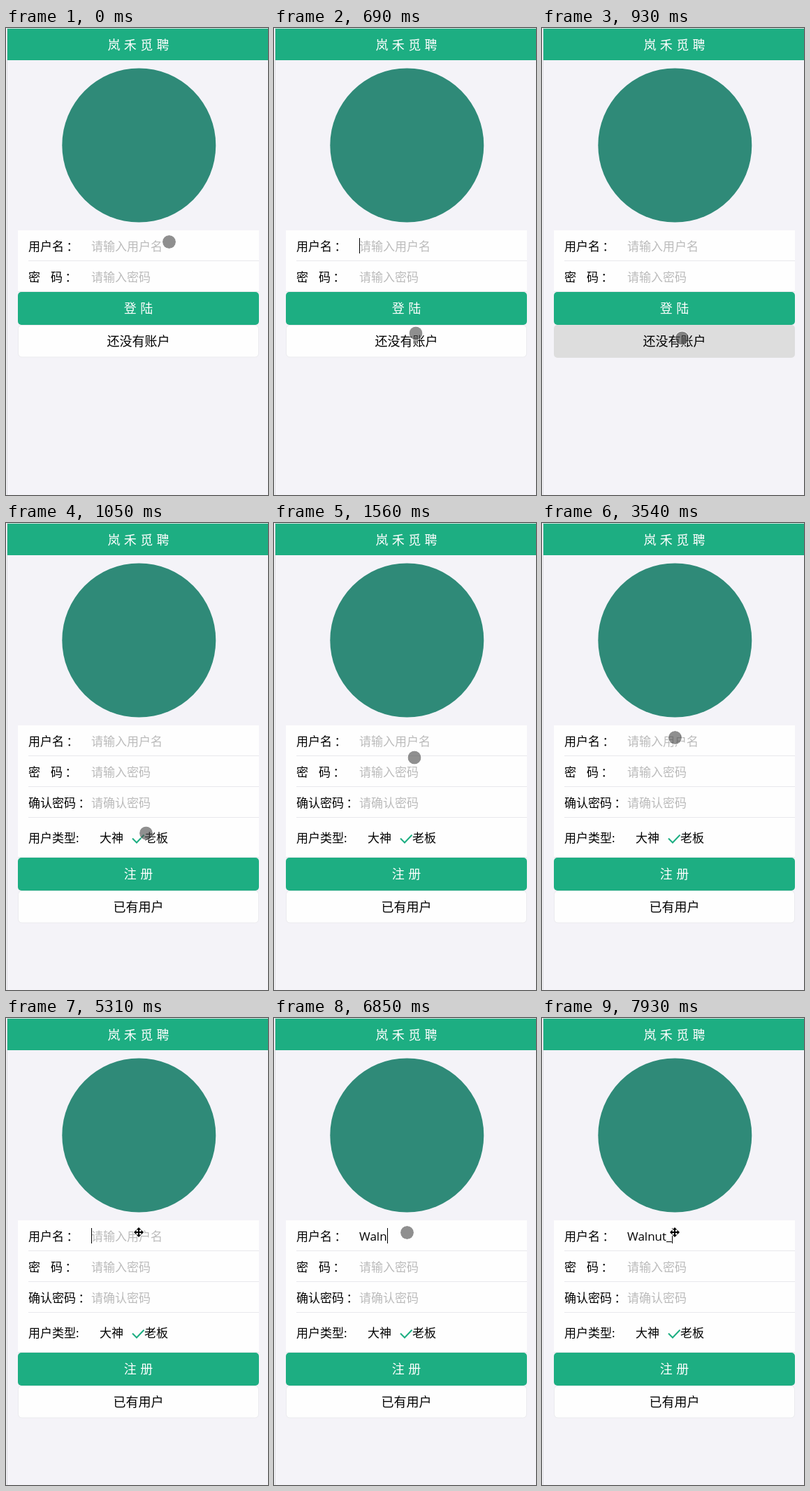
These frames come from a looping animation (375 px wide and 667 px high, 8000 ms). An HTML page with a canvas:

```html
<!DOCTYPE html>
<html lang="zh-CN">
<head>
<meta charset="utf-8">
<title>岚禾觅聘</title>
<style>
  html, body { margin: 0; width: 100%; height: 100%; overflow: hidden; background: #f4f3f8; }
  canvas { display: block; width: 375px; height: 667px; }
</style>
</head>
<body>
<canvas id="stage"></canvas>
<script>
const W = 375, H = 667, LOOP = 8000;
const GREEN = '#1dae82', BG = '#f4f3f8', LINE = '#e8e8ec', HINT = '#bbb';
const FONT = '"Open Sans", "Noto Sans CJK SC", "Noto Sans CJK", sans-serif';
const PRESS = 930, SWITCH = 1050, USER = 'Walnut_';

// [time, x, y] of the touch point, held until the next entry
const PATH = [
  [0, 233.5, 305.5], [300, 238, 318], [420, 228, 368], [540, 212, 418],
  [690, 203, 436], [810, 200.5, 443], [1170, 203, 447], [1320, 210, 416],
  [1440, 208, 374], [1560, 201, 335], [1710, 202, 314], [2150, 192.5, 307],
  [2270, 190.5, 306.5]
];
const KEYS = [5740, 6020, 6420, 6850, 7010, 7160, 7930];
const CARET = [[420, 810], [2150, 2550], [3100, 3540], [4010, 4600],
  [5060, 5620], [5740, 7680], [7930, LOOP]];
const MOVE = [[5310, 5620], [7680, LOOP]];

const canvas = document.getElementById('stage');
const ctx = canvas.getContext('2d');
const dpr = window.devicePixelRatio || 1;
canvas.width = W * dpr;
canvas.height = H * dpr;
ctx.scale(dpr, dpr);

const within = (t, spans) => spans.some(([a, b]) => t >= a && t < b);

function rect(x, y, w, h, color) {
  ctx.fillStyle = color;
  ctx.fillRect(x, y, w, h);
}

function disc(x, y, r, color) {
  ctx.fillStyle = color;
  ctx.beginPath();
  ctx.arc(x, y, r, 0, Math.PI * 2);
  ctx.fill();
}

function text(str, x, midY, color = '#000', size = 17) {
  ctx.font = `${size}px ${FONT}`;
  ctx.fillStyle = color;
  ctx.fillText(str, x, midY + 6);
}

function centered(str, midY, color, gap = 0) {
  const pitch = 18 + gap;
  const left = 189.5 - (pitch * str.length - gap) / 2;
  [...str].forEach((ch, i) => text(ch, left + i * pitch, midY, color, 18));
}

function box(x, y, w, h, fill, stroke) {
  ctx.beginPath();
  ctx.roundRect(x, y, w, h, 5);
  ctx.fillStyle = fill;
  ctx.fill();
  if (stroke) {
    ctx.strokeStyle = stroke;
    ctx.lineWidth = 1;
    ctx.stroke();
  }
}

// the full-width colon sits a little right of the label
function colon(x, midY) {
  text('：', x + 3.5, midY);
}

function buttons(y, main, other, pressed) {
  box(17, y, 345, 47, GREEN);
  if (pressed) box(17, y + 47, 345, 47, '#ddd');
  else box(17.5, y + 47.5, 344, 45.5, '#fefefe', '#ebebef');
  centered(main, y + 23.5, '#fff', 5.3);
  centered(other, y + 70.5, '#000');
}

function frame() {
  rect(0, 0, W, H, BG);
  rect(0, 0, 1, H, '#f8f8fa');
  rect(1, 0, 1, H, '#dadae0');
  rect(2, 0, W - 2, 1, '#d9e6e3');
  rect(2, 1, W - 2, 45, GREEN);
  centered('岚禾觅聘', 24.5, '#fff', 5.3);
  disc(190.3, 167.5, 110, '#2f8a78');
}

function form(t) {
  const signUp = t >= SWITCH;
  const bottom = signUp ? 478 : 377;
  rect(17, 289, 345, bottom - 289, '#fefefe');
  for (const y of signUp ? [332, 376, 420] : [332]) rect(32, y, 330, 1, LINE);
  rect(17, bottom - 1, 345, 1, LINE);

  text('用户名', 32, 312);
  colon(83, 312);
  text('密', 32, 356);
  text('码', 64, 356);
  colon(81, 356);
  text('请输入密码', 122, 356, HINT);

  const typed = USER.slice(0, KEYS.filter(k => t >= k).length);
  if (typed) text(typed, 122, 312);
  else text('请输入用户名', 122, 312, HINT);
  if (within(t, CARET)) {
    ctx.font = `17px ${FONT}`;
    rect(122 + Math.round(ctx.measureText(typed).width), 300, 1, 22, '#000');
  }

  if (!signUp) {
    buttons(bottom, '登陆', '还没有账户', t >= PRESS);
    return;
  }
  text('确认密码', 32, 400);
  colon(100, 400);
  text('请确认密码', 122, 400, HINT);
  text('用户类型:', 32, 450);
  text('大神', 134, 450);
  text('老板', 198, 450);
  ctx.strokeStyle = GREEN;
  ctx.lineWidth = 2;
  ctx.beginPath();
  ctx.moveTo(181, 450.5);
  ctx.lineTo(187, 456.5);
  ctx.lineTo(197.5, 445.5);
  ctx.stroke();
  buttons(bottom, '注册', '已有用户', false);
}

function moveIcon(x, y) {
  ctx.save();
  ctx.translate(x, y);
  ctx.beginPath();
  for (let i = 0; i < 4; i++) {
    ctx.rect(-1, -5, 2, 5);
    ctx.moveTo(0, -7);
    ctx.lineTo(3.5, -3.5);
    ctx.lineTo(-3.5, -3.5);
    ctx.closePath();
    ctx.rotate(Math.PI / 2);
  }
  ctx.strokeStyle = '#fff';
  ctx.lineWidth = 2;
  ctx.stroke();
  ctx.fillStyle = '#000';
  ctx.fill();
  ctx.restore();
}

function pointer(t) {
  if (within(t, MOVE)) {
    moveIcon(190, 306);
    return;
  }
  const [, x, y] = PATH.filter(p => t >= p[0]).pop();
  disc(x, y, 9.5, 'rgba(75, 75, 75, 0.62)');
  ctx.strokeStyle = 'rgba(255, 255, 255, 0.7)';
  ctx.lineWidth = 1;
  ctx.beginPath();
  ctx.arc(x, y, 10, 0, Math.PI * 2);
  ctx.stroke();
}

const start = performance.now();
function tick() {
  const t = (performance.now() - start) % LOOP;
  frame();
  form(t);
  pointer(t);
  requestAnimationFrame(tick);
}
tick();
</script>
</body>
</html>
```
